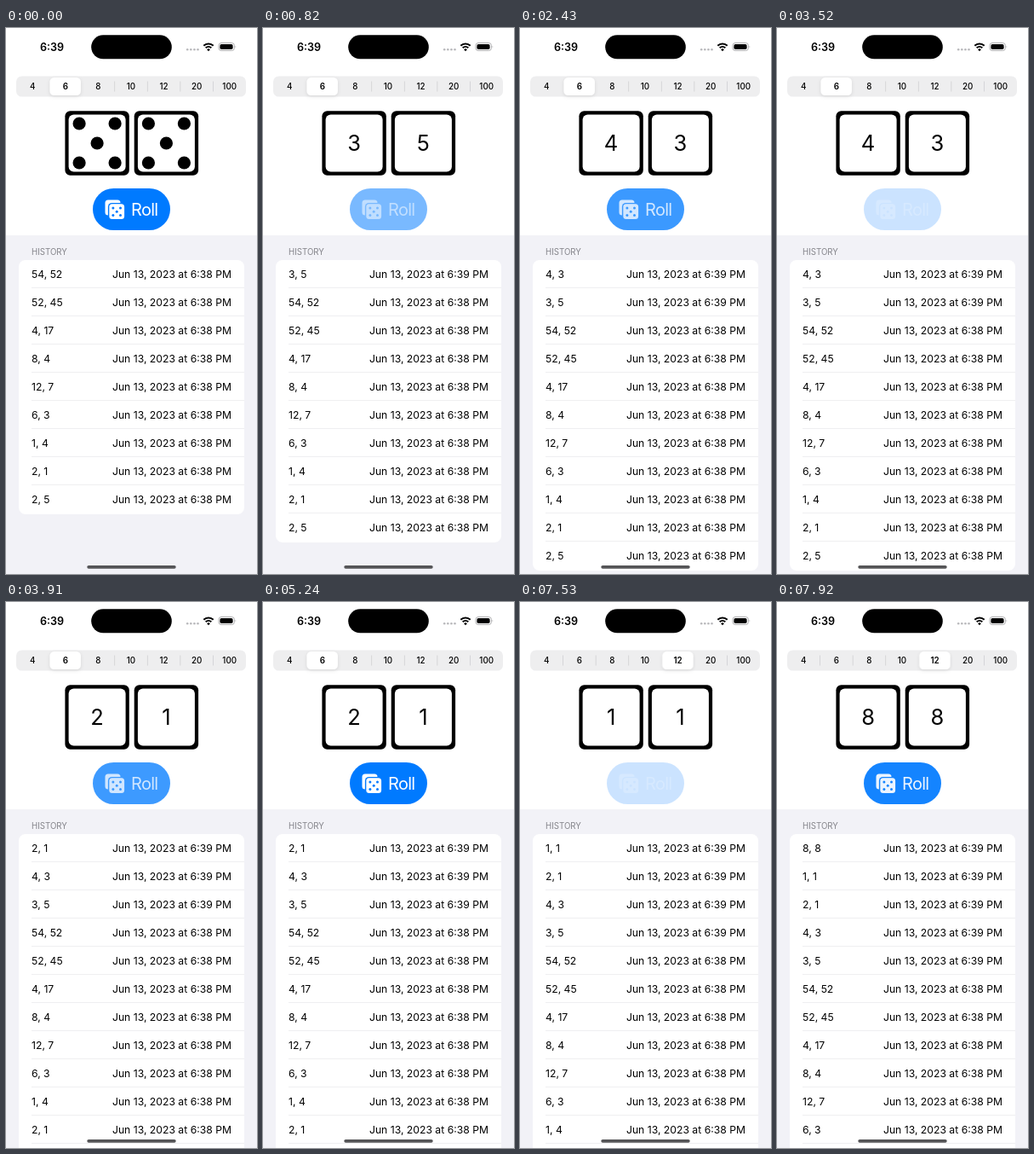
An HTML page for the animation above (7.99 s loop, 295 by 640 pixels).

```html
<!DOCTYPE html>
<html lang="en">
<head>
<meta charset="utf-8">
<title>Dice roller</title>
<style>
  html, body { margin: 0; width: 100%; height: 100%; overflow: hidden; }
  body {
    position: relative;
    background: linear-gradient(#fff 243px, #f2f2f7 243px);
    font-family: Inter, Roboto, sans-serif;
    color: #000;
  }
  svg { position: absolute; left: 0; top: 0; }
  .card {
    position: absolute; left: 15px; top: 272px;
    width: 265px; height: 298px;
    border-radius: 8px; background: #fff; overflow: hidden;
  }
  .row {
    position: relative; height: 33px; padding: 0 15px;
    display: flex; justify-content: space-between;
    font-size: 12.2px; line-height: 34px; white-space: nowrap;
  }
  .row:not(:last-child)::after {
    content: ""; position: absolute; left: 15px; right: 0; bottom: 0;
    height: 1px; background: #efeff1;
  }
  .seg { font-size: 9.8px; font-weight: 500; text-anchor: middle; }
  .face text { font-size: 25.5px; text-anchor: middle; }
</style>
</head>
<body>
<div class="card" id="card"><div id="rows"></div></div>

<svg width="295" height="640" viewBox="0 0 295 640">
  <defs>
    <filter id="soft" x="-20%" y="-30%" width="140%" height="180%">
      <feDropShadow dx="0" dy="1.5" stdDeviation="2" flood-opacity=".1"/>
    </filter>
    <mask id="cut" maskUnits="userSpaceOnUse" x="110" y="195" width="35" height="35">
      <rect x="116.5" y="201.5" width="18" height="18" rx="3.5" fill="#fff"/>
      <rect x="119.9" y="204.9" width="20.6" height="20.6" rx="4.6"/>
      <rect x="121.3" y="206.3" width="17.8" height="17.8" rx="3.5" fill="#fff"/>
      <g id="holes"></g>
    </mask>
  </defs>

  <!-- status bar -->
  <text x="54" y="26.5" font-size="12.6" font-weight="600" text-anchor="middle">6:39</text>
  <rect x="100.2" y="8.3" width="94.6" height="28" rx="14"/>
  <g fill="#b9b9bc">
    <circle cx="213.2" cy="25.3" r="1.3"/><circle cx="217.3" cy="25.3" r="1.3"/>
    <circle cx="221.4" cy="25.3" r="1.3"/><circle cx="225.5" cy="25.3" r="1.3"/>
  </g>
  <g fill="none" stroke="#000" stroke-width="2">
    <path d="M232.3 20.8a8 8 0 0 1 11.4 0M234.7 23.3a4.7 4.7 0 0 1 6.6 0"/>
  </g>
  <path d="M238 27.2l-1.9-1.9a2.7 2.7 0 0 1 3.8 0z"/>
  <rect x="250" y="17.5" width="18.4" height="9" rx="3" fill="none" stroke="#a5a5a8" stroke-width=".9"/>
  <rect x="251.4" y="18.9" width="15.2" height="6.2" rx="1.8"/>
  <path d="M269.6 20.5q1.4 1.5 0 3z" fill="#a5a5a8"/>

  <!-- sides picker -->
  <rect x="12" y="56.4" width="270" height="24.2" rx="6.6" fill="#eeeeef"/>
  <g id="dividers" fill="#cfcfd2"></g>
  <rect id="thumb" x="51.5" y="57.9" width="36.4" height="21.2" rx="5.2" fill="#fff" filter="url(#soft)"/>
  <g id="labels"></g>

  <g id="dice"></g>

  <!-- roll button -->
  <rect id="pill" x="102" y="188" width="91" height="49" rx="24.5" fill="#007aff"/>
  <g id="label" fill="#fff">
    <rect x="110" y="195" width="35" height="35" mask="url(#cut)"/>
    <text x="147" y="219.8" font-size="20" letter-spacing="-.7">Roll</text>
  </g>

  <text x="30" y="265.9" font-size="9.7" fill="#85858b">HISTORY</text>
  <rect x="95.3" y="629.9" width="104.4" height="3.8" rx="1.9" fill="#555557"/>
</svg>

<script>
const LOOP = 7990, ROW = 33, SEG = 270 / 7;
const $ = id => document.getElementById(id);

// [press, release, settled] of each roll, in ms
const taps = [
  [500, 590, 1110], [2040, 2130, 2610], [3520, 3620, 4090],
  [6490, 6560, 6970], [7530, 7610, LOOP]
];
const rolled = ["3, 5", "4, 3", "2, 1", "1, 1", "8, 8"];
const earlier = ["54, 52", "52, 45", "4, 17", "8, 4", "12, 7", "6, 3", "1, 4", "2, 1", "2, 5"];
const pick = { start: 5310, end: 5760, ease: "cubic-bezier(.25,.6,.3,1)" };

// keys: [ms, value, easing until the next key]
function track(el, prop, keys) {
  const last = keys[keys.length - 1];
  if (last[0] < LOOP) keys = [...keys, [LOOP, last[1]]];
  el.animate(keys.map(([ms, value, easing = "linear"]) =>
    ({ offset: ms / LOOP, [prop]: value, easing })), { duration: LOOP, iterations: Infinity });
}
const steps = (el, prop, keys) => track(el, prop, keys.map(([ms, v]) => [ms, v, "step-end"]));

function svg(tag, attrs, parent, text) {
  const el = document.createElementNS("http://www.w3.org/2000/svg", tag);
  for (const k in attrs) el.setAttribute(k, attrs[k]);
  if (text !== undefined) el.textContent = text;
  return parent.appendChild(el);
}

function pips(parent, cx, cy, dx, dy, r) {
  for (const [x, y] of [[-1, -1], [1, -1], [0, 0], [-1, 1], [1, 1]])
    svg("circle", { cx: cx + x * dx, cy: cy + y * dy, r }, parent);
}

// history list
const addRow = (roll, time) => $("rows").insertAdjacentHTML("beforeend",
  `<div class="row"><span>${roll}</span><span>Jun 13, 2023 at ${time} PM</span></div>`);
[...rolled].reverse().forEach(r => addRow(r, "6:39"));
earlier.forEach(r => addRow(r, "6:38"));
const changes = [0, ...taps.map(t => t[1])];
steps($("rows"), "transform", changes.map((ms, i) => [ms, `translateY(${(i - rolled.length) * ROW}px)`]));
steps($("card"), "height", changes.map((ms, i) => [ms, (earlier.length + i) * ROW + 1 + "px"]));

// dice
const centers = [107.1, 188.4], midY = 135;
const square = (cx, half, fill) => svg("rect",
  { x: cx - half, y: midY - half, width: 2 * half, height: 2 * half, rx: 6, fill }, $("dice"));
for (const cx of centers) {
  square(cx, 37.7, "#000");
  square(cx, 33.5, "#fff");
}
[null, ...rolled].forEach((roll, i) => {
  const face = svg("g", { class: "face" }, $("dice"));
  centers.forEach((cx, d) => roll
    ? svg("text", { x: cx, y: 144.3 }, face, roll.split(", ")[d])
    : pips(face, cx, midY, 21, 23, 7.6));
  steps(face, "opacity", changes.map((ms, k) => [ms, k === i ? 1 : 0]));
});

// button
pips($("holes"), 130.2, 215.2, 4.3, 4.3, 1.5);
function fade(el, low) {
  const keys = [[0, 1, "step-end"]];
  for (const [press, release, end] of taps)
    keys.push([press, low, "step-end"], [release, low, "ease-in-out"], [end, end === LOOP ? .97 : 1, "step-end"]);
  track(el, "opacity", keys);
}
fade($("pill"), .2);
fade($("label"), .22);

// picker: the choice moves from 6 to 12
const glide = (el, prop, a, b) =>
  track(el, prop, [[0, a], [pick.start, a, pick.ease], [pick.end, b]]);
glide($("thumb"), "transform", "translateX(0px)", `translateX(${3 * SEG}px)`);
[4, 6, 8, 10, 12, 20, 100].forEach((n, i) => {
  const weight = at => i === at ? 600 : 500;
  const label = svg("text", { class: "seg", x: 12 + (i + .5) * SEG, y: 72.1 }, $("labels"), n);
  steps(label, "fontWeight", [[0, weight(1)], [pick.start, weight(4)]]);
  if (!i) return;
  const shown = at => i === at || i === at + 1 ? 0 : 1;
  const line = svg("rect", { x: 11.6 + i * SEG, y: 62.5, width: .8, height: 12 }, $("dividers"));
  glide(line, "opacity", shown(1), shown(4));
});
</script>
</body>
</html>
```
